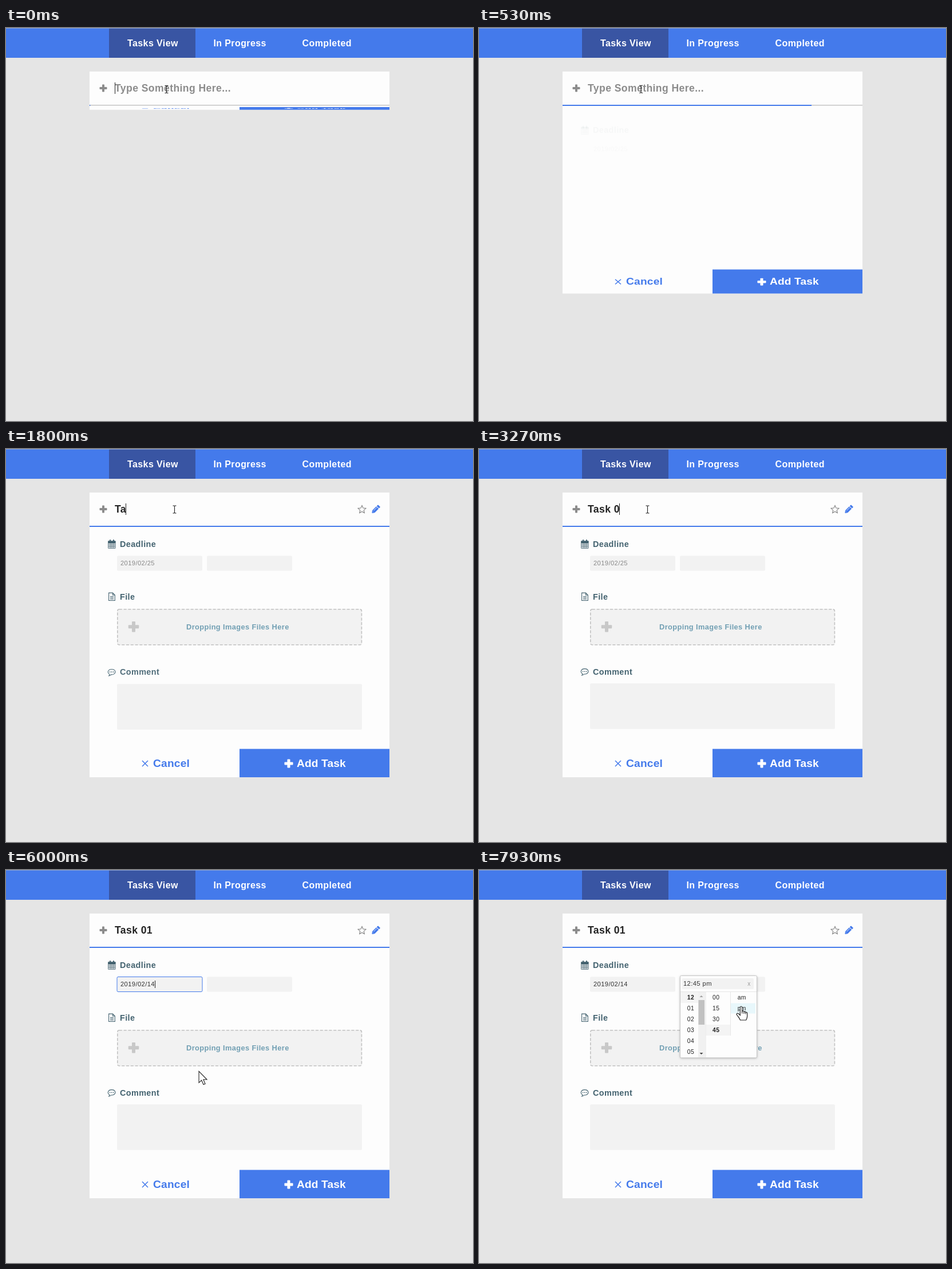
Animation, 816 px wide and 686 px high, one loop 8000 ms. Source, as an HTML page with a canvas:

```html
<!DOCTYPE html>
<html lang="en">
<head>
<meta charset="utf-8">
<title>Task form</title>
<style>
html, body { margin: 0; width: 100%; height: 100%; overflow: hidden; background: #e5e5e5; }
canvas { display: block; }
</style>
</head>
<body>
<canvas id="stage" width="816" height="686"></canvas>
<script>
const c = document.getElementById('stage').getContext('2d');
const LOOP = 8000;
const BLUE = '#447aeb', CARD = '#fdfdfd', FIELD = '#f2f2f2', SLATE = '#446370', GREY = '#8c8c8c';

const clamp = x => Math.max(0, Math.min(1, x));
const span = (t, start, length) => clamp((t - start) / length);
const easeOut = x => 1 - (1 - x) ** 2;

// cubic-bezier(.25, .1, .25, 1)
function ease(x) {
  let lo = 0, hi = 1;
  for (let i = 0; i < 20; i++) {
    const u = (lo + hi) / 2;
    if (.75 * u * (1 - u) + u ** 3 < x) lo = u; else hi = u;
  }
  return .3 * (1 - lo) ** 2 * lo + 3 * (1 - lo) * lo * lo + lo ** 3;
}

function rect(x, y, w, h, fill, r = 0, line) {
  c.beginPath();
  c.roundRect(x, y, w, h, r);
  if (fill) { c.fillStyle = fill; c.fill(); }
  if (line) { c.strokeStyle = line; c.stroke(); }
}

function poly(points, fill, line, width = 1) {
  c.beginPath();
  points.forEach(([x, y]) => c.lineTo(x, y));
  c.closePath();
  if (fill) { c.fillStyle = fill; c.fill(); }
  if (line) { c.strokeStyle = line; c.lineWidth = width; c.stroke(); }
  c.lineWidth = 1;
}

function strokes(d, color, width = 1.2) {
  c.strokeStyle = color;
  c.lineWidth = width;
  c.stroke(new Path2D(d));
  c.lineWidth = 1;
}

function text(str, x, y, size, color, bold, spacing = .4, align = 'left') {
  c.font = `${bold ? 'bold ' : ''}${size}px "Liberation Sans", Arial, sans-serif`;
  c.letterSpacing = spacing + 'px';
  c.textAlign = align;
  c.fillStyle = color;
  c.fillText(str, x, y);
}
const mid = (str, x, y, size, color, bold) => text(str, x, y, size, color, bold, .4, 'center');

function plus(x, y, size, thick, color) {
  rect(x - size / 2, y - thick / 2, size, thick, color, 1);
  rect(x - thick / 2, y - size / 2, thick, size, color, 1);
}

function at(x, y, draw) {
  c.save();
  c.translate(x, y);
  draw();
  c.restore();
}

// Fades in while sliding up
function appear(t, start, draw) {
  const p = ease(span(t, start, 840));
  if (!p) return;
  c.save();
  c.globalAlpha = p;
  c.translate(0, 12.8 * (1 - p));
  draw();
  c.restore();
}

const caret = (x, y, h) => rect(Math.round(x), y, 1, h, '#222');
const blink = (t, since) => (t - since) % 1060 < 530;

function header() {
  rect(0, 0, 816, 52, BLUE);
  rect(180, 0, 151, 52, '#3955a3');
  rect(0, 0, 816, 1, '#8ba3d6');
  text('Tasks View', 212, 32, 16, '#fff', true);
  text('In Progress', 362.4, 32, 16, '#fff', true);
  text('Completed', 517.6, 32, 16, '#fff', true);
}

const KEYS = [1600, 1800, 2000, 2730, 3070, 3270, 3530];

function title(t) {
  rect(146, 76, 524, 60, CARD);
  plus(170, 105, 13, 4, GREY);
  const n = KEYS.filter(k => t >= k).length;
  const typed = 'Task 01'.slice(0, n);
  if (n) text(typed, 190, 111, 17.6, '#222', true);
  else text('Type Something Here...', 190, 111, 17.6, GREY, true);
  const width = n ? c.measureText(typed).width : 0;
  if (t < 4330 && blink(t, n ? KEYS[n - 1] : -125)) caret(190 + width - (n ? .8 : 0), 95, 20);

  rect(146, 134, 524, 1.6, '#c4c4c4');
  rect(146, 134, 524 * easeOut(span(t, 0, 903)), 2, BLUE);
  appear(t, 950, star);
  appear(t, 762, pencil);
}

function star() {
  const points = [];
  for (let i = 0; i < 10; i++) {
    const r = i % 2 ? 3.4 : 7.2, a = i * Math.PI / 5;
    points.push([622 + r * Math.sin(a), 105.8 - r * Math.cos(a)]);
  }
  poly(points, null, '#888', 1.2);
}

function pencil() {
  at(646, 105.3, () => {
    c.rotate(-Math.PI / 4);
    poly([[-9, 0], [-8.6, -.8], [-5, -2.9], [4.3, -2.9], [4.3, 2.9], [-5, 2.9], [-8.6, .8]], BLUE);
    rect(5.2, -2.9, 3.4, 5.8, BLUE, 1);
    strokes('M-4 -1H3.6M-7 0H-6', CARD, .8);
  });
}

function panel(t) {
  const p = easeOut(span(t, -43, 941));
  const bottom = 136 + 437 * p ** 1.75;
  rect(146, 136, 524, bottom - 136, CARD);
  at(0, bottom, () => {
    c.scale(1, p);
    rect(408, -49.5, 262, 49.5, BLUE);
    strokes('M238 -29L248 -19M248 -29L238 -19', BLUE, 1.5);
    text('Cancel', 257, -18.5, 19.2, BLUE, true, .2);
    plus(494, -24, 15, 5, '#fff');
    text('Add Task', 508, -18.5, 19.2, '#fff', true, .1);
  });
}

const ring = (x, w) => rect(x + .5, 186.5, w - 1, 26, null, 2, BLUE);

function deadline(t) {
  strokes('M178.7 161H191V173.3H178.7ZM178.7 164.5H191M182 161V173M185 164.5V173M188 161V173M178.7 167.5H191M178.7 170.4H191', SLATE, .9);
  rect(178.3, 160.3, 13.2, 3.6, SLATE, 1);
  rect(181, 158, 2, 4.5, SLATE, 1);
  rect(187, 158, 2, 4.5, SLATE, 1);
  text('Deadline', 199, 170.6, 14.4, SLATE, true);
  rect(194, 186.5, 149, 26, FIELD, 2);
  rect(351, 186.5, 149, 26, FIELD, 2);
  const picked = t >= 5870;
  text(picked ? '2019/02/14' : '2019/02/25', 200, 203.2, 11.2, picked ? '#333' : '#888');
  if (t >= 4470 && t < 6600) {
    ring(193.5, 150);
    if (blink(t, picked ? 5870 : 4470)) caret(picked ? 259.5 : 201, 193, 13);
  }
  if (t >= 6600 && t < 6870) ring(350.5, 150);
}

function file() {
  strokes('M179.6 251.1H186.5L190.3 255V264.5H179.6ZM186.5 251.1V255H190.3M182 257.5H188M182 259.7H188M182 262H188', SLATE, 1.1);
  text('File', 199, 263.4, 14.4, SLATE, true);
  rect(194, 279, 428, 63.5, FIELD, 3);
  c.save();
  c.setLineDash([5, 2.8]);
  c.lineWidth = 1.6;
  rect(194.8, 279.8, 426.6, 62, null, 3, '#c2c2c2');
  c.restore();
  plus(223, 310.3, 18.5, 6, '#c8c8c8');
  text('Dropping Images Files Here', 315, 314.8, 12.8, '#719fb3', true);
}

function comment() {
  strokes('M181 392.5C176 389 178.5 383.6 184.7 383.6S193 389 188.5 392C186.5 393.3 185 393 183.6 393Q182 394.8 179.8 395Q181 393.8 181 392.5Z', SLATE, 1.1);
  for (const x of [181.6, 184.7, 187.8]) rect(x - .9, 387.4, 1.8, 1.8, SLATE, .9);
  text('Comment', 199, 393.6, 14.4, SLATE, true);
  rect(194, 409.3, 428, 79.5, FIELD, 2);
}

function popup(x, y, w, h, r) {
  c.save();
  c.shadowColor = 'rgba(0,0,0,.28)';
  c.shadowBlur = 4;
  c.shadowOffsetY = 1;
  rect(x, y, w, h, CARD, r);
  c.restore();
}

function calendar() {
  popup(194, 213, 247.5, 239, 0);
  text('febbraio 2019', 211.5, 239, 14.4, '#333', false, .5);
  poly([[391, 234.5], [399, 229], [399, 240]], '#80939b');
  poly([[418.5, 234.5], [410.5, 229], [410.5, 240]], '#80939b');
  const col = i => 221.8 + 31.75 * i;
  'lu ma me gi ve sa do'.split(' ').forEach((d, i) => mid(d, col(i), 268, 9.6, '#8c8c8c'));
  for (let d = 1; d <= 28; d++) {
    const cell = d + 3, today = d === 25;
    mid(d, col(cell % 7), 300.8 + 31.75 * Math.floor(cell / 7), 11.2, today ? '#d0021b' : '#333', today);
  }
}

function clock(t) {
  const hour = t >= 7200, minute = t >= 7630, hover = t >= 7870;
  popup(351.5, 184.5, 134, 143, 2);
  rect(351.5, 184.5, 134, 143.5, null, 2, '#c6c6c6');
  rect(355, 189, 125, 19, FIELD, 2);
  if (hour) text(minute ? '12:45 pm' : '12:00 pm', 357, 202.4, 11.2, '#333');
  else if (blink(t, 6730)) caret(357, 192, 13);
  mid('x', 472, 201.5, 10, '#999');
  rect(352, 212, 133, 1, '#e6e6e6');
  if (hour) rect(352, 213, 31, 19, '#f4f4f4');
  if (minute) rect(396, 270, 43, 19, '#f4f4f4');
  if (hover) rect(440, 232.5, 43, 18, '#e8f7fb');
  rect(395.5, 213, 1, 114, '#e6e6e6');
  rect(439, 213, 1, 76, '#e6e6e6');
  const list = (items, x, chosen) => items.split(' ').forEach((s, i) =>
    mid(s, x, 226.3 + 19 * i, 10.4, '#222', s === chosen));
  list('12 01 02 03 04 05', 370, hour && '12');
  list('00 15 30 45', 414.3, minute && '45');
  list('am pm', 459.3);
  rect(383, 213, 12, 114, '#f1f1f1');
  rect(383.5, 227, 10.5, 43, '#c1c1c1');
  poly([[385.5, 222], [391.5, 222], [388.5, 219]], '#a0a0a0');
  poly([[385.5, 319], [391.5, 319], [388.5, 322]], '#444');
}

// time, x, y, pointer shape from then on
const PATH = [
  [0, 280.5, 107, 'beam'], [470, 280.5, 107, 'beam'], [800, 294.5, 105.5, 'beam'],
  [4000, 294.5, 105.5, 'beam'], [4130, 308, 84, 'arrow'], [4330, 285, 196, 'beam'],
  [4470, 283.5, 206, 'beam'], [4800, 283.5, 206, 'arrow'], [5130, 300, 343, 'hand'],
  [5330, 322, 363, 'hand'], [5870, 322, 363, 'arrow'], [6000, 337, 351, 'arrow'],
  [6400, 364, 262, 'arrow'], [6530, 384, 202, 'beam'], [6870, 384, 202, 'hand'],
  [7070, 372, 224, 'hand'], [7270, 372, 224, 'hand'], [7540, 411, 280, 'hand'],
  [7700, 411, 280, 'hand'], [7900, 458, 237.5, 'hand'], [LOOP, 458, 237.5, 'hand']
];

const POINTERS = {
  beam() {
    strokes('M-3 -6.5H-1L0 -5.5L1 -6.5H3M0 -5.5V5.5M-3 6.5H-1L0 5.5L1 6.5H3', '#222', 1.1);
  },
  arrow() {
    poly([[0, .5], [0, 20.5], [4.6, 16.2], [8, 23.8], [11, 22.4], [7.8, 15], [14, 15]], '#fff', '#222', 1.1);
  },
  hand() {
    const d = new Path2D('M-1.7 2Q0 -1 1.7 2V9Q4.3 7.5 5 10Q7.3 8.8 8 11Q10.7 10 10.7 13V18Q10.5 21 8.7 24.5H-1.5Q-3 21 -5.5 18L-8 14.5Q-7.5 11.8 -4.8 13L-1.7 16Z');
    c.fillStyle = '#fff';
    c.fill(d);
    c.strokeStyle = '#222';
    c.lineWidth = 1.2;
    c.stroke(d);
    strokes('M1.7 9V13M5 10V13.5M8 11V14', '#222');
  }
};

function pointer(t) {
  const i = PATH.findIndex(k => k[0] > t);
  const [t0, x0, y0, shape] = PATH[i - 1], [t1, x1, y1] = PATH[i];
  const p = (t - t0) / (t1 - t0);
  at(x0 + (x1 - x0) * p, y0 + (y1 - y0) * p, POINTERS[shape]);
}

function draw(t) {
  rect(0, 0, 816, 686, '#e5e5e5');
  header();
  panel(t);
  title(t);
  appear(t, 482, () => deadline(t));
  appear(t, 854, file);
  appear(t, 1226, comment);
  if (t >= 4530 && t < 5870) calendar();
  if (t >= 6670) clock(t);
  pointer(t);
}

const begin = performance.now();
(function frame() {
  draw((performance.now() - begin) % LOOP);
  requestAnimationFrame(frame);
})();
</script>
</body>
</html>
```
